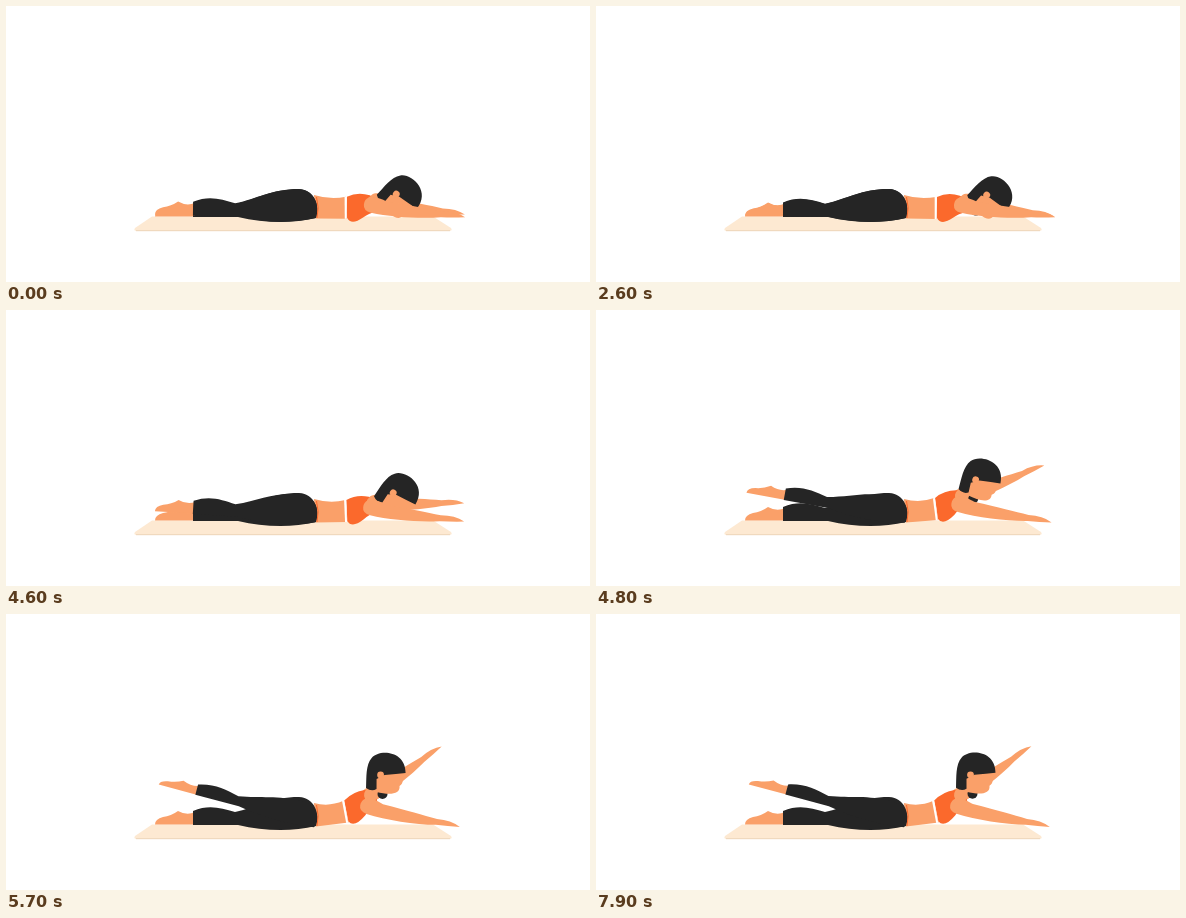
An HTML page with a canvas that plays this animation: 584x276 px, repeating every 8000 ms.

```html
<!DOCTYPE html>
<html lang="en">
<head>
<meta charset="utf-8">
<title>Alternate arm and leg lift</title>
<style>
  html, body { margin: 0; width: 100%; height: 100%; overflow: hidden; background: #fff; }
  canvas { display: block; width: 584px; height: 276px; }
</style>
</head>
<body>
<canvas id="stage"></canvas>
<script>
const W = 584, H = 276, LOOP = 8000, STEP = 100;
const SKIN = '#faa069', BLACK = '#252525', ORANGE = '#fb692c', MAT = '#fde9d2';
const canvas = document.getElementById('stage');
const ctx = canvas.getContext('2d');
const dpr = window.devicePixelRatio || 1;
canvas.width = W * dpr;
canvas.height = H * dpr;

// Limbs and head are drawn once and posed by transforms.
const LEG = 'M187,197 C203,190 215,194 229,198 C252,193 265,183 293,183 ' +
  'C309,184 314,200 310,212 C285,218 258,217 232,211 L187,211Z';
const FOOT = 'M189,198 Q181,202 172,197 Q165,202 157,203 Q149,205 149,210.5 L189,210.5Z';
const ARM = 'M-8,0 C-8,-12 6,-9 14,-6 C40,-5 55,-4 70,-3 Q84,-5 94,0 ' +
  'Q82,2 70,3 C50,7 20,9 0,7 Q-8,6 -8,0Z';
const HAIR = 'M25,-2 C25,-25 -2,-26 -9,-17 C-15,-10 -14,2 -14.5,13 ' +
  'Q-9,17 -4,14 L-4,4 L4,0 Q16,-1 25,-2Z';
const FACE = 'M-4,-2 L24,-3 C21,4 24,8 19,11 C20,20 8,20 -4,17Z';

// The torso is curved upwards by bend().
const WAIST = 'M308,189 Q324,194 340,191 L341,213 L310,212.5Z';
const TOP = 'M341,191 Q352,186 364,190 L373,195 L371,206 Q362,208 357,212 Q345,220 341,212Z';
const BAND = 'M339.7,191 L339.7,213';

const mix = (a, b, k) => a + (b - a) * k;
const clamp = v => Math.min(1, Math.max(0, v));
const smooth = v => v * v * (3 - 2 * v);

function fill(d, color) {
  ctx.fillStyle = color;
  ctx.fill(new Path2D(d));
}

function line(d, color, width) {
  ctx.strokeStyle = color;
  ctx.lineWidth = width;
  ctx.stroke(new Path2D(d));
}

function dot(x, y, r, color) {
  ctx.beginPath();
  ctx.arc(x, y, r, 0, Math.PI * 2);
  ctx.fillStyle = color;
  ctx.fill();
}

function posed(x, y, deg, draw) {
  ctx.save();
  ctx.translate(x, y);
  ctx.rotate(deg * Math.PI / 180);
  draw();
  ctx.restore();
}

// The spine rises with the square of the distance from the waist.
function bend(x, y, k) {
  const d = Math.max(0, x - 311) / 53;
  return [x - .35 * d * (205 - y) * k, y - 14 * d * d * k];
}

const bent = (d, k) => d.replace(/([\d.]+),([\d.]+)/g, (_, x, y) => bend(+x, +y, k).join());

// Settle, creep up, then snap into the full lift and hold.
function liftAt(t) {
  const settle = .045 * Math.exp(-t / 400);
  const creep = .23 * smooth(clamp((t - 2200) / 2400));
  const snap = .77 * (1 - Math.exp(-Math.max(0, t - 4600) / 220));
  return settle + creep + snap;
}

function drawMat() {
  fill('M129,222 L146,210.5 L427,210.5 L445,222 Q447,225 443,225 L131,225 Q127,225 129,222Z', MAT);
  line('M130,224.7 L444,224.7', '#eed5bb', 1);
}

function drawLeg() {
  fill(FOOT, SKIN);
  fill(LEG, BLACK);
}

function drawNeck(ear, k) {
  ctx.lineCap = 'round';
  line(`M${bend(368, 197, k)} L${ear[0]},${ear[1] + 7}`, SKIN, 14);
  ctx.lineCap = 'butt';
}

function drawHead(ear, k) {
  posed(...ear, mix(42, 0, k), () => {
    dot(2, 19, 5, BLACK);
    fill(FACE, SKIN);
    fill(HAIR, BLACK);
    dot(0, 0, 3.4, SKIN);
  });
}

function draw(k) {
  const ear = [mix(391, 374.5, k), mix(189.5, 160.8, k)];
  ctx.setTransform(dpr, 0, 0, dpr, 0, 0);
  ctx.fillStyle = '#fff';
  ctx.fillRect(0, 0, W, H);
  drawMat();

  posed(mix(371, 362, k), mix(196, 183, k), mix(10.5, -34.7, k), () => {
    ctx.scale(.95, .95);
    fill(ARM, SKIN);
  });
  fill(bent(WAIST, k), SKIN);
  drawLeg();
  posed(297, 204, 15 * k, () => {
    ctx.scale(1, mix(1, .75, k));
    ctx.translate(-297, -204);
    drawLeg();
  });
  line('M310.5,191 Q313.5,202 311,212', ORANGE, 1);

  fill(bent(TOP, k), ORANGE);
  line(bent(BAND, k), '#fff', 2);
  drawNeck(ear, k);
  drawHead(ear, k);
  posed(mix(366, 362, k), mix(200, 193, k), mix(6.8, 12.3, k), () => fill(ARM, SKIN));
}

function tick(now) {
  draw(liftAt(Math.floor(now % LOOP / STEP) * STEP));
  requestAnimationFrame(tick);
}
requestAnimationFrame(tick);
</script>
</body>
</html>
```
